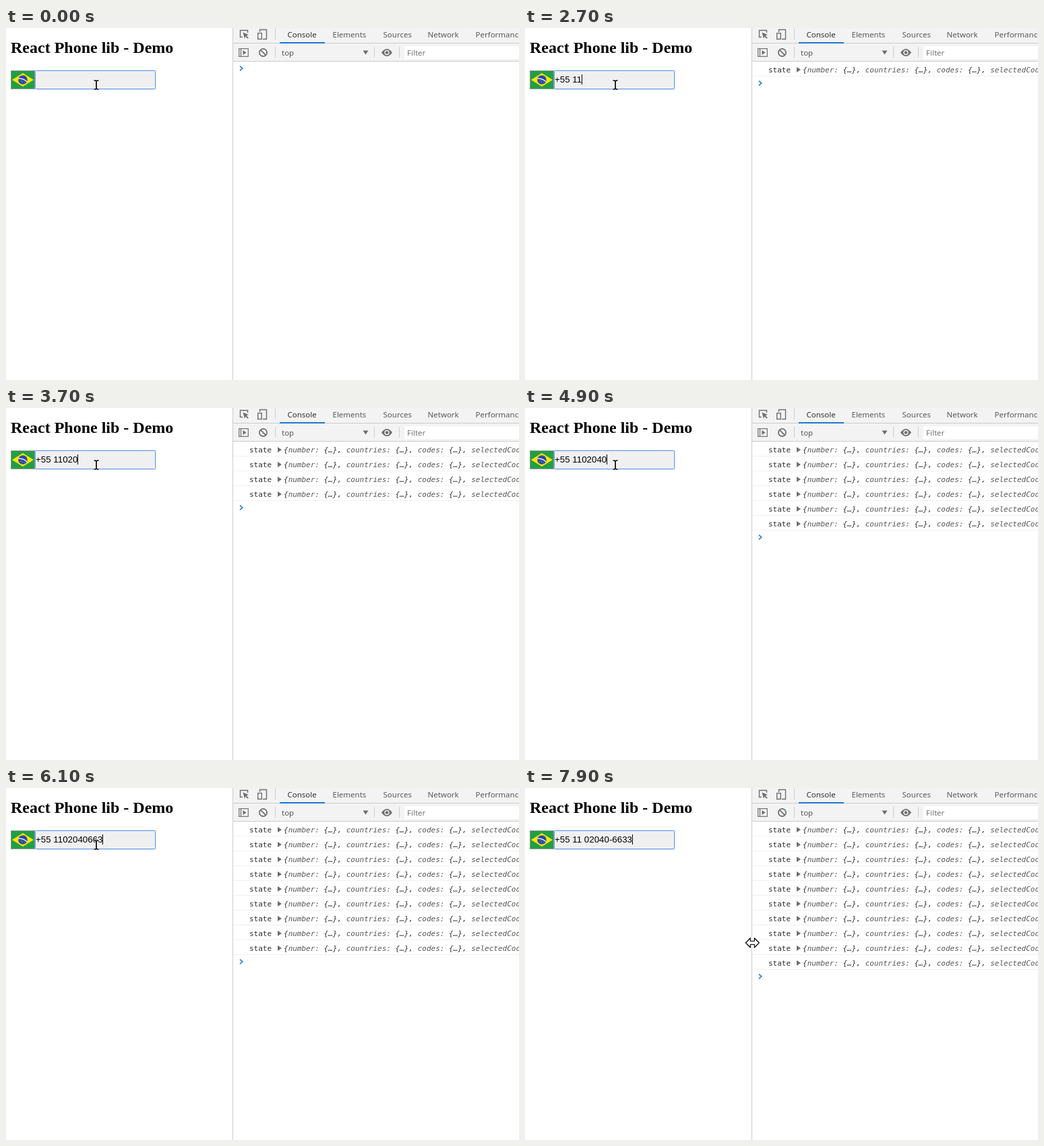
Recreate the animation shown at these times as an HTML page. Size 761 by 523 pixels, loop 8000 ms.

```html
<!DOCTYPE html>
<html lang="en">
<head>
<meta charset="utf-8">
<title>Phone input demo</title>
<style>
  html, body { margin: 0; width: 100%; height: 100%; overflow: hidden; background: #fff; }
  svg { display: block; }
  text { white-space: pre; }
  .title { font: bold 24px "Liberation Serif", serif; }
  .number { font: 13.333px "Liberation Sans", sans-serif; }
  .ui { font: 11.5px "Noto Sans", "Open Sans", sans-serif; fill: #5a5a5a; }
  .log { font: 11px "DejaVu Sans Mono", monospace; fill: #303030; }
  .preview { font-style: italic; }
  .key { fill: #565656; }
  .icon { fill: none; stroke: #6e6e6e; stroke-width: 1.4; }
  .solid { fill: #6e6e6e; }
  .pointer { fill: #fff; stroke: #000; stroke-width: 1.2; stroke-linejoin: round; }
</style>
</head>
<body>
<svg width="761" height="523" viewBox="0 0 761 523">
  <!-- page -->
  <text class="title" x="7" y="37">React Phone lib - Demo</text>
  <g id="flag">
    <rect x="7.5" y="63.5" width="35" height="27" fill="#229e45" stroke="#999"/>
    <path d="M9 77 25 67 41 77 25 87Z" fill="#f8e509"/>
    <circle cx="25" cy="77" r="6.8" fill="#2b49a3"/>
    <path d="M18.6 75.2Q26 74.6 31 80" fill="none" stroke="#fff" stroke-width="1.3"/>
    <path d="M21 79h1M24 80.5h1M27 81h1M23 78h1" stroke="#b9c4e6" stroke-width=".8"/>
  </g>
  <rect x="42.5" y="62.5" width="180" height="29" rx="2" fill="none" stroke="#5e97f6" stroke-opacity=".25"/>
  <rect x="43.5" y="63.5" width="178" height="27" rx="1" fill="#f0f0f0" stroke="#6b9be8"/>
  <text class="number" id="number" x="44" y="81"></text>
  <rect id="caret" y="69" width="1" height="15"/>

  <!-- developer tools -->
  <rect x="337" width="424" height="50" fill="#f3f3f3"/>
  <path d="M336.5 0V523M337 22.5H761M337 49.5H761" stroke="#ccc"/>
  <path d="M399.5 1V17M399.5 28V44M546.5 28V44M583.5 28V44" stroke="#ccc"/>
  <rect x="406" y="21" width="67" height="2" fill="#1a78d6"/>
  <rect x="591" y="27" width="170" height="19" fill="#fff"/>
  <g class="ui">
    <text x="417.5" y="14" style="fill:#333">Console</text>
    <text x="484.5" y="14">Elements</text>
    <text x="559.5" y="14">Sources</text>
    <text x="625.5" y="14">Network</text>
    <text x="696.5" y="14">Performance</text>
    <text x="409" y="41">top</text>
    <text x="595" y="41" style="fill:#777">Filter</text>
  </g>
  <g class="icon">
    <path d="M351 13.5H347.5V3.5H358.5V7"/>
    <path d="M376.5 6V2.5H386.5V16.5H381"/>
    <rect x="373.7" y="7.7" width="5.6" height="8.8"/>
    <rect x="345.7" y="30.7" width="13.6" height="11.6" stroke-width="1.2"/>
    <path d="M348.5 31V42" stroke-width="1.2"/>
    <circle cx="381.5" cy="36.5" r="5.6" stroke-width="1.7"/>
    <path d="M377.6 32.6 385.4 40.4" stroke-width="1.7"/>
  </g>
  <g class="solid">
    <path d="M351.5 6.5 360 10 356.6 11.2 359.8 14.4 358.4 15.8 355.2 12.6 354 16Z"/>
    <path d="M351.5 33 356.5 36.5 351.5 40Z"/>
    <path d="M529.5 33.5H537.5L533.5 39.5Z"/>
    <path d="M557 36.5Q565 25.5 573 36.5Q565 47.5 557 36.5Z"/>
  </g>
  <circle cx="565" cy="36.5" r="3" fill="#6e6e6e" stroke="#f3f3f3" stroke-width="1.4"/>
  <g id="rows"></g>
  <path id="prompt" d="M347 56.7 350.8 60 347 63.3" fill="none" stroke="#1a7ce0" stroke-width="1.6"/>

  <!-- mouse pointers, each with its hot spot at 0,0 -->
  <g id="beam">
    <path id="stem" d="M-3.5-6.5H-1.5L0-5.5 1.5-6.5H3.5M0-5.5V5.5M-3.5 6.5H-1.5L0 5.5 1.5 6.5H3.5" fill="none" stroke="#fff" stroke-width="3.4"/>
    <path d="M-3.5-6.5H-1.5L0-5.5 1.5-6.5H3.5M0-5.5V5.5M-3.5 6.5H-1.5L0 5.5 1.5 6.5H3.5" fill="none" stroke="#000" stroke-width="1.7"/>
  </g>
  <path id="arrow" class="pointer" d="M0 0V15L3.5 11.8 6 17.5 8.6 16.3 6.2 10.8H11Z"/>
  <path id="resize" class="pointer" d="M-10 0-3-7V-2.5H3V-7L10 0 3 7V2.5H-3V7Z"/>
</svg>
<script>
  const LOOP = 8000;
  const DIGITS = "5511020406633";
  const ROW = 22;

  // Time of each key press, in ms
  const KEYS = [500, 1500, 2000, 2400, 2700, 3200, 3400, 3700, 4100, 4900, 5500, 5800, 6100, 6400];
  // Spans in which the caret is dark
  const BLINKS = [[0, 500], [1100, 1500], [4700, 4900], [7100, 7600]];
  // Time, pointer, x, y
  const MOVES = [
    [0, "beam", 134, 84.5],
    [7700, "arrow", 192, 119],
    [7800, "arrow", 285, 190],
    [7900, "resize", 337.3, 230]
  ];

  const $ = id => document.getElementById(id);

  function logRow(i) {
    const y = ROW * i;
    const entry = name => `<tspan class="key">${name}:</tspan> {…}, `;
    return `<g>
      <text class="log" x="361" y="${66 + y}">state</text>
      <path class="solid" d="M403 ${58 + y}l6 4-6 4Z"/>
      <text class="log preview" x="412" y="${66 + y}">{${["number", "countries", "codes"].map(entry).join("")}<tspan class="key">selectedCode:</tspan> {…}}</text>
      <path d="M337 ${71.5 + y}H761" stroke="#f0f0f0"/>
    </g>`;
  }
  $("rows").innerHTML = Array.from({ length: 10 }, (_, i) => logRow(i)).join("");
  const rows = [...$("rows").children];

  function typed(n) {
    if (!n) return "";
    const d = DIGITS.slice(0, n - 1);
    if (n < 5) return "+" + d;
    const area = d.slice(2, 4), rest = d.slice(4);
    return n < KEYS.length
      ? `+55 ${area}${rest}`
      : `+55 ${area} ${rest.slice(0, 5)}-${rest.slice(5)}`;
  }

  const show = (el, on) => el.setAttribute("visibility", on ? "visible" : "hidden");

  let shown = -1;
  function setCount(n) {
    if (n === shown) return;
    shown = n;
    const number = $("number");
    number.textContent = typed(n);
    const width = n ? number.getComputedTextLength() : 0;
    $("caret").setAttribute("x", Math.round(44 + width));
    const lines = Math.max(0, n - 4);
    rows.forEach((row, i) => show(row, i < lines));
    $("prompt").setAttribute("transform", `translate(0 ${ROW * lines})`);
  }

  function draw(now) {
    const t = now % LOOP;
    setCount(KEYS.filter(k => k <= t).length);
    show($("caret"), !BLINKS.some(([from, to]) => t >= from && t < to));

    const [, pointer, x, y] = MOVES.filter(m => m[0] <= t).pop();
    for (const id of ["beam", "arrow", "resize"]) show($(id), id === pointer);
    $(pointer).setAttribute("transform", `translate(${x} ${y})`);
  }

  const start = performance.now();
  function tick() {
    draw(performance.now() - start);
    requestAnimationFrame(tick);
  }
  tick();
</script>
</body>
</html>
```
